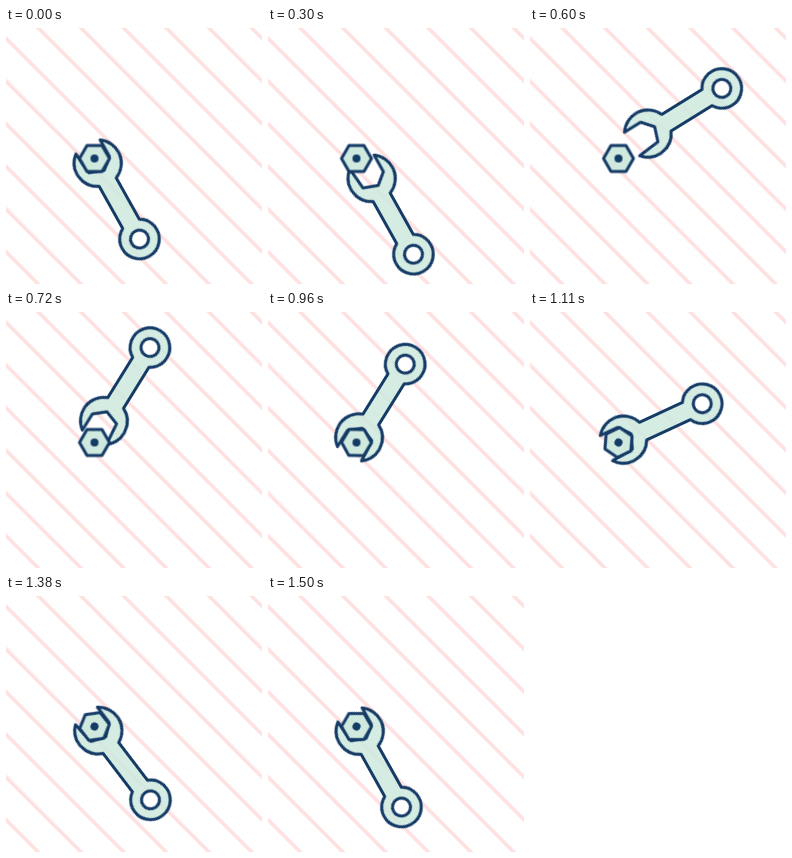
These frames come from a looping animation (256x256 px, 1650 ms). An HTML page without scripts:

```html
<!DOCTYPE html>
<html lang="en">
<head>
<meta charset="utf-8">
<title>Wrench turning a nut</title>
<style>
  html, body { margin: 0; width: 100%; height: 100%; overflow: hidden; background: #fff; }
  svg { display: block; width: 100vw; height: 100vh; }

  .part { fill: #cfe9df; stroke: #143a66; stroke-width: 3; stroke-linejoin: round; }
  .see-through { fill-opacity: .86; }
  .dot { fill: #143a66; }

  .turn, .slide, .nut { animation: 1650ms infinite both; }
  .turn { animation-name: turn; }
  .slide { animation-name: slide; }
  .nut { animation-name: tighten; }

  /* swing back while off the nut, then tighten */
  @keyframes turn {
    0%, 18.18% { transform: rotate(60.8deg); animation-timing-function: cubic-bezier(.42, 0, .58, 1); }
    45.45%, 56.36% { transform: rotate(-59.2deg); animation-timing-function: cubic-bezier(.333, 0, .52, 1); }
    90.91%, 100% { transform: rotate(60.8deg); }
  }
  /* pull off along the jaw, then push back on */
  @keyframes slide {
    0%, 9.09% { transform: translate(0, 0); animation-timing-function: cubic-bezier(.42, 0, .55, 1); }
    28.18%, 29.09% { transform: translate(39.5px, -6.3px); animation-timing-function: cubic-bezier(.333, 0, .667, 1); }
    56.36%, 100% { transform: translate(0, 0); }
  }
  @keyframes tighten {
    0%, 56.36% { transform: rotate(0deg); animation-timing-function: cubic-bezier(.333, 0, .52, 1); }
    90.91%, 100% { transform: rotate(120deg); }
  }
</style>
</head>
<body>
<svg viewBox="0 0 256 256">
  <defs>
    <pattern id="stripes" width="42.667" height="42.667" patternUnits="userSpaceOnUse" x="32.3">
      <path d="M-10-10L53 53M-10 32.667L10 52.667M32.667-10L52.667 10" stroke="#ffe0e0" stroke-width="3.6"/>
    </pattern>
  </defs>
  <rect width="256" height="256" fill="#fff"/>
  <rect width="256" height="256" fill="url(#stripes)"/>

  <g transform="translate(88.5 130.5)">
    <g class="turn">
      <g class="slide">
        <path class="part see-through" d="M-13.5-14L5.5-14L15-2.7L9.8 11.8L-13 14
          A23.5 23.5 0 0 0 26.7 9.5L74.9 9.5
          A19.8 19.8 0 1 0 74.9-9.5L27.5-9.5
          A23.5 23.5 0 0 0 -13.5-14Z"/>
        <circle class="part" cx="92.3" r="9" style="fill: #fff"/>
      </g>
    </g>
    <g class="nut">
      <path class="part" d="M15 0L7.5 13H-7.5L-15 0L-7.5-13H7.5Z"/>
      <circle class="dot" r="4"/>
    </g>
  </g>
</svg>
</body>
</html>
```
